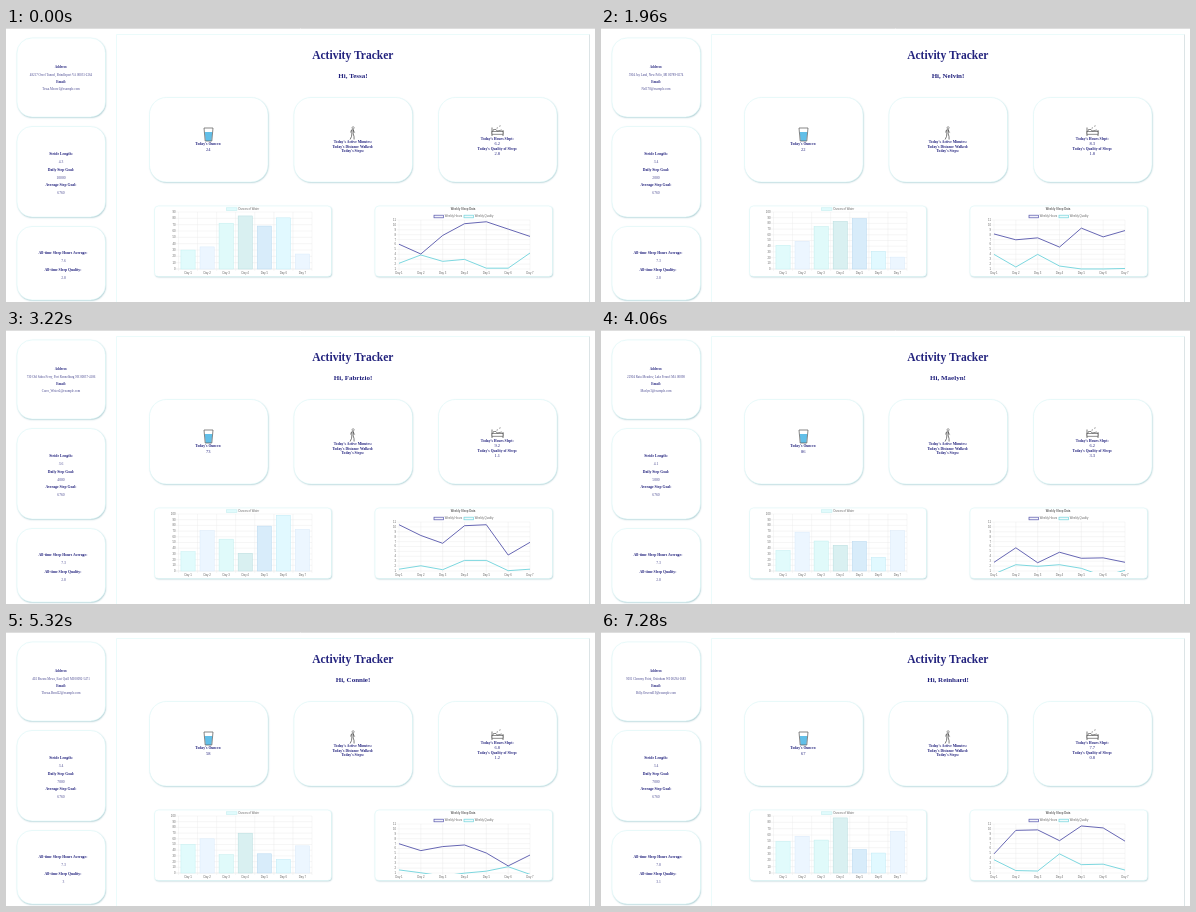
An HTML page with a canvas for the animation above (8260 ms loop, 589 by 274 pixels).

```html
<!DOCTYPE html>
<html lang="en">
<head>
<meta charset="utf-8">
<title>Activity Tracker</title>
<style>
html, body { margin: 0; width: 100%; height: 100%; overflow: hidden; background: #fff; }
canvas { display: block; width: 589px; height: 274px; }
</style>
</head>
<body>
<canvas id="stage"></canvas>
<script>
const LOOP = 8260, STEP = 70, GROW = 1000;
const NAVY = '#23237e', CYAN = '#6fd3dc';
const SERIF = '"Liberation Serif", serif', SANS = '"Liberation Sans", sans-serif';

// gone: the page reloads empty; start: data arrives and the charts grow
const users = [
  { gone: -840, start: -770, name: 'Tessa', address: '48217 Orvel Tunnel, Brindleport VA 00031-2264', email: 'Tessa.Moore1@example.com',
    stride: '4.3', goal: '10000', avgHours: '7.6', avgQuality: '2.8', ounces: 24, slept: '6.2', quality: '2.8', top: 90,
    water: [30, 35, 72.5, 84, 68, 81, 23.7],
    hours: [6.1, 4.1, 7.9, 10.3, 10.7, 9.2, 7.7], rest: [2.2, 3.9, 2.6, 3, 1.2, 1.2, 4.3] },
  { gone: 1120, start: 1260, name: 'Nelvin', address: '5904 Jay Land, New Pello, MI 00789-0274', email: 'Nel178@example.com',
    stride: '3.4', goal: '2000', avgHours: '7.3', avgQuality: '2.8', ounces: 22, slept: '8.3', quality: '1.8', top: 100,
    water: [42, 49, 75, 84, 89, 31, 21],
    hours: [8.3, 7.1, 7.5, 5.6, 9.5, 7.7, 9], rest: [4.1, 1.5, 4.1, 1.7, 1.1, 1.1, 1.2] },
  { gone: 2380, start: 2450, name: 'Fabrizio', address: '730 Old Sabra Ferry, Port Rennelburg NE 00037-4186', email: 'Carro_Wister2@example.com',
    stride: '3.6', goal: '4000', avgHours: '7.3', avgQuality: '2.8', ounces: 73, slept: '9.2', quality: '1.1', top: 100,
    water: [34, 71, 56, 31, 79, 98, 73],
    hours: [10.5, 8.3, 6.7, 10.3, 10.5, 4.3, 6.9], rest: [1.4, 2.1, 1.3, 3.2, 3.2, 1.1, 1.4] },
  { gone: 3640, start: 3710, name: 'Maelyn', address: '22904 Ruta Meadow, Lake Fennel MA 00098', email: 'Maelyn3@example.com',
    stride: '4.1', goal: '5000', avgHours: '7.3', avgQuality: '2.8', ounces: 86, slept: '6.2', quality: '3.3', top: 100,
    water: [44, 83, 64, 55, 63, 29, 86],
    hours: [5.6, 9.2, 5.5, 8.1, 6.6, 6.7, 5.6], rest: [2.7, 5, 4.6, 5, 4.1, 2.2, 3.6] },
  { gone: 4900, start: 4970, name: 'Connie', address: '402 Bezzra Mews, East Quill MI 00092-5471', email: 'Thessa.Bend22@example.com',
    stride: '3.4', goal: '7000', avgHours: '7.3', avgQuality: '3', ounces: 58, slept: '6.8', quality: '1.2', top: 100,
    water: [61, 73, 39, 85, 41, 29, 58],
    hours: [10.7, 9, 10, 10.4, 8.4, 5.2, 7.9], rest: [4.2, 3.5, 2.7, 3.4, 3.9, 5, 3.1] },
  { gone: 6160, start: 6230, name: 'Reinhard', address: '9031 Clemmy Point, Ostinham WI 00294-1683', email: 'Billy.Orwend19@example.com',
    stride: '3.4', goal: '7000', avgHours: '7.8', avgQuality: '3.1', ounces: 67, slept: '7.7', quality: '0.8', top: 90,
    water: [50, 58, 52, 87, 37, 31.5, 66],
    hours: [4.9, 9.7, 9.8, 7.6, 10.6, 10.2, 7.5], rest: [3.7, 1.5, 1.4, 4.9, 2.7, 2.8, 1.6] }
];

const canvas = document.getElementById('stage');
const ctx = canvas.getContext('2d');
const scale = window.devicePixelRatio || 1;
canvas.width = 589 * scale;
canvas.height = 274 * scale;

function text(str, x, y, size, { color = NAVY, bold = false, font = SERIF, align = 'center' } = {}) {
  ctx.font = `${bold ? 'bold ' : ''}${size}px ${font}`;
  ctx.fillStyle = color;
  ctx.textAlign = align;
  ctx.textBaseline = 'alphabetic';
  ctx.fillText(str, x, y + size * 0.33);
}

const label = (str, x, y, size = 3.7) => text(str, x, y, size, { bold: true });
const small = (str, x, y, align = 'center', bold = false) =>
  text(str, x, y, 2.8, { font: SANS, color: '#666', align, bold });

function path(points, color, width) {
  ctx.beginPath();
  points.forEach(([x, y]) => ctx.lineTo(x, y));
  ctx.strokeStyle = color;
  ctx.lineWidth = width;
  ctx.stroke();
}

function box(x, y, w, h, fill, stroke, width = 0.5) {
  ctx.fillStyle = fill;
  ctx.fillRect(x, y, w, h);
  ctx.strokeStyle = stroke;
  ctx.lineWidth = width;
  ctx.strokeRect(x, y, w, h);
}

function card(x, y, w, h, radius) {
  ctx.save();
  ctx.beginPath();
  ctx.roundRect(x, y, w, h, radius);
  ctx.shadowColor = '#a9c9cf';
  ctx.shadowBlur = 1.6 * scale;
  ctx.shadowOffsetX = 0.5 * scale;
  ctx.shadowOffsetY = 0.8 * scale;
  ctx.fillStyle = '#fff';
  ctx.fill();
  ctx.restore();
  ctx.strokeStyle = '#ddf8f8';
  ctx.lineWidth = 0.6;
  ctx.stroke();
}

function drawGlass(x, y) {
  ctx.fillStyle = '#62bfe8';
  ctx.beginPath();
  [[-3.8, 4], [3.8, 4], [2.9, 13], [-2.9, 13]].forEach(([dx, dy]) => ctx.lineTo(x + dx, y + dy));
  ctx.fill();
  path([[x - 4.5, y], [x - 3.3, y + 13], [x + 3.3, y + 13], [x + 4.5, y], [x - 4.5, y]], '#555', 0.7);
}

function drawWalker(x, y) {
  ctx.beginPath();
  ctx.arc(x + 0.6, y + 1.3, 1.1, 0, 7);
  ctx.strokeStyle = '#444';
  ctx.lineWidth = 0.5;
  ctx.stroke();
  path([[x - 2, y + 6], [x - 1, y + 3.4], [x + 0.9, y + 3], [x + 1.2, y + 5], [x + 2.6, y + 6]], '#444', 0.6);
  path([[x - 0.6, y + 3.5], [x - 0.7, y + 7.5], [x - 1, y + 10], [x - 2.4, y + 13]], '#444', 0.7);
  path([[x + 0.9, y + 3.5], [x + 0.7, y + 7.3], [x + 1.5, y + 10], [x + 1.6, y + 13]], '#444', 0.7);
}

function drawBed(x, y) {
  path([[x - 5.5, y + 2.5], [x - 5.5, y + 11]], '#444', 0.7);
  path([[x + 5.5, y + 5], [x + 5.5, y + 11]], '#444', 0.7);
  box(x - 5.5, y + 6.5, 11, 2.7, '#fff', '#444', 0.6);
  path([[x - 4.5, y + 6], [x - 4, y + 4.5], [x - 1.5, y + 4.5], [x - 0.5, y + 6], [x + 4.5, y + 5]], '#444', 0.6);
  small('z', x - 0.3, y + 3);
  small('z', x + 2.5, y + 1);
}

function drawSidebar(user) {
  card(11, 10, 88.5, 79, 15);
  card(11, 98.5, 88.5, 90.5, 15);
  card(11, 198.5, 88.5, 73.5, 15);
  const rows = user ? [39, 53.8, 126, 141.7, 157, 225, 242] : [43, 53.8, 130, 141.7, 153, 229, 242];
  const titles = ['Address:', 'Email:', 'Stride Length:', 'Daily Step Goal:', 'Average Step Goal:',
    'All-time Sleep Hours Average:', 'All-time Sleep Quality:'];
  const values = user
    ? [user.address, user.email, user.stride, user.goal, '6760', user.avgHours, user.avgQuality]
    : ['', '', '', '', '0', '', ''];
  titles.forEach((title, i) => {
    const x = i > 4 ? 57 : 55, size = i < 2 ? 3.3 : 3.75;
    label(title, x, rows[i], size);
    text(values[i], i > 4 ? 57.5 : 55, rows[i] + (i < 2 ? 7.5 : 8), i < 2 ? 3.15 : 3.7, { color: '#4a4a91' });
  });
}

function drawToday(user) {
  const top = user ? 69.5 : 62;
  [143.5, 288, 432.5].forEach(x => card(x, top, 118.5, 84.5, 17));

  const glassY = user ? 100 : 95;
  drawGlass(202.5, glassY);
  label("Today's Ounces:", 202.3, glassY + 15.5);

  const walkY = user ? 98.5 : 91;
  drawWalker(346.5, walkY);
  ["Today's Active Minutes:", "Today's Distance Walked:", "Today's Steps:"]
    .forEach((str, i) => label(str, 346.8, walkY + 15.5 + i * 4.4));

  const bedY = user ? 97 : 94;
  drawBed(491.5, bedY);
  label("Today's Hours Slept:", 491.3, bedY + 14);
  label("Today's Quality of Sleep:", 491.3, user ? 120.8 : 112.7);

  if (!user) return;
  text(user.ounces, 202.3, 121.2, 4.5);
  text(user.slept, 491.3, 115.9, 4.5);
  text(user.quality, 491.3, 125.7, 4.5);
}

const GRID = '#e7e7e7';

function drawWater(user, grow) {
  const left = 172.5, right = 306, top = 184, bottom = 241, pitch = (right - left) / 7;
  const y = v => bottom - v / user.top * (bottom - top);
  const fills = ['#e1fbfc', '#ecf6ff', '#e0fafa', '#d9f0f1', '#d8ecfa', '#e1f9ff', '#ecf6ff'];
  const edges = ['#c3f0f2', '#d9eafa', '#c0eded', '#b5dcdd', '#b6d7ef', '#bfeaf5', '#d9eafa'];
  box(220.5, 179.8, 10.5, 2.6, '#e1fbfc', '#b9ecee');
  small('Ounces of Water', 232.2, 181.1, 'left');
  for (let v = 0; v <= user.top; v += 10) {
    path([[left - 2.5, y(v)], [right, y(v)]], v ? GRID : '#cfcfcf', 0.4);
    small(v, left - 3, y(v), 'right');
  }
  for (let i = 0; i <= 7; i++) {
    const x = left + i * pitch;
    path([[x, top], [x, bottom + 2]], GRID, 0.4);
  }
  user.water.forEach((v, i) => {
    const x = left + (i + 0.5) * pitch, yTop = y(v * grow);
    box(x - 7.1, yTop, 14.2, bottom - yTop, fills[i], edges[i]);
    small('Day ' + (i + 1), x, 244.8);
  });
}

function drawSleep(user, grow) {
  const left = 393, right = 524, top = 192, bottom = 241, origin = 296, pitch = (right - left) / 6;
  const y = v => bottom - (v - 1) * (bottom - top) / 10;
  small('Weekly Sleep Data', 457, 181.1, 'center', true);
  box(428, 187.2, 9.5, 2.6, '#f3f3fa', '#5555ab', 0.7);
  small('Weekly Hours', 438.7, 188.5, 'left');
  box(458, 187.2, 9.5, 2.6, '#f0fafb', CYAN, 0.7);
  small('Weekly Quality', 468.7, 188.5, 'left');
  for (let v = 1; v <= 11; v++) {
    path([[left - 2.5, y(v)], [right, y(v)]], GRID, 0.4);
    small(v, left - 3, y(v), 'right');
  }
  for (let i = 0; i < 7; i++) {
    const x = left + i * pitch;
    path([[x, top], [x, bottom + 2]], GRID, 0.4);
    small('Day ' + (i + 1), x, 244.8);
  }
  ctx.save();
  ctx.beginPath();
  ctx.rect(left - 1, top - 1, right - left + 2, bottom - top + 2);
  ctx.clip();
  const series = (data, color) =>
    path(data.map((v, i) => [left + i * pitch, origin + (y(v) - origin) * grow]), color, 0.9);
  series(user.rest, CYAN);
  series(user.hours, '#5555ab');
  ctx.restore();
}

function draw(t) {
  const latest = users.filter(u => u.gone <= t).pop();
  const user = t >= latest.start ? latest : null;
  ctx.setTransform(scale, 0, 0, scale, 0, 0);
  ctx.fillStyle = '#fff';
  ctx.fillRect(0, 0, 589, 274);
  path([[0, 0.5], [589, 0.5]], '#dedede', 1);
  path([[110.5, 274], [110.5, 6.5], [583.5, 6.5]], '#e6fafa', 0.8);
  path([[583.5, 6.5], [583.5, 274]], '#d3dde0', 0.8);

  label('Activity Tracker', 346.8, 27.3, 11.5);
  if (user) label(`Hi, ${user.name}!`, 347, 47.3, 7);
  drawSidebar(user);
  drawToday(user);

  const chartTop = user ? 178 : 169.3;
  card(148.5, chartTop, 177, 70.5, 4);
  card(369, chartTop, 177.5, 70.5, 4);
  if (!user) return;
  const progress = Math.min(1, (t - user.start) / GROW);
  const grow = 1 - (1 - progress) ** 4;
  drawWater(user, grow);
  drawSleep(user, grow);
}

const begin = performance.now();
function tick() {
  const t = (performance.now() - begin) % LOOP;
  draw(t - t % STEP);
  requestAnimationFrame(tick);
}
tick();
</script>
</body>
</html>
```
